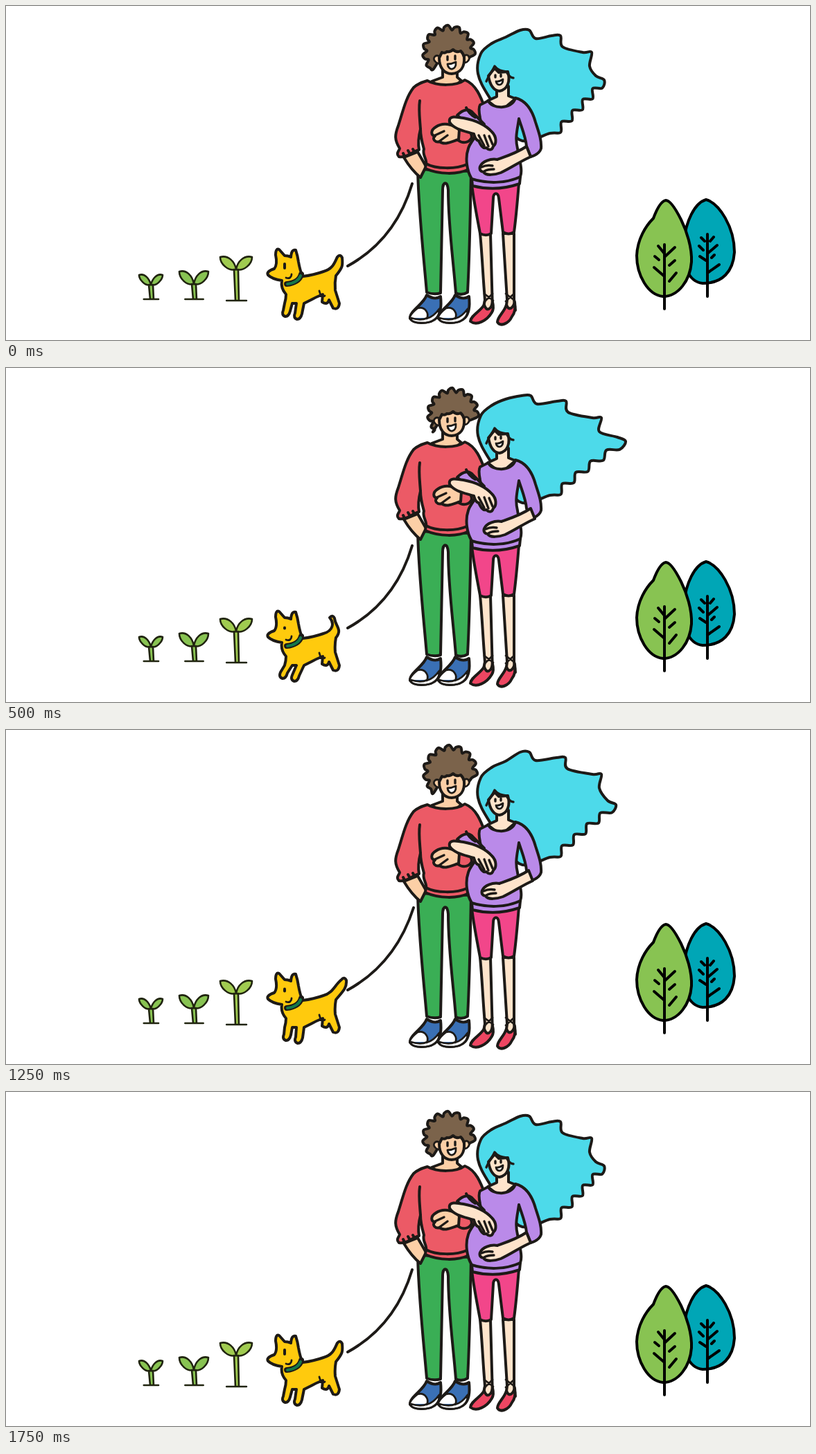
These frames come from a looping animation (1160x483 px, 2000 ms). An HTML page:

```html
<!DOCTYPE html>
<html lang="en">
<head>
<meta charset="utf-8">
<title>Family walk</title>
<style>
html, body { margin: 0; width: 100%; height: 100%; overflow: hidden; background: #fff; }
svg { display: block; width: 100%; height: 100%; }
.ink { stroke: #1d1a17; stroke-width: 4; stroke-linecap: round; stroke-linejoin: round; fill: none; }
.thin { stroke-width: 2.8; }
.finger { stroke-width: 3.4; }
.leaf { stroke: #000; }
.sprout { stroke: #20240f; stroke-width: 2.6; }
.red { fill: #ec5a66; }
.green { fill: #3aae55; }
.peach { fill: #fccfa6; }
.cream { fill: #fee4cb; }
.purple { fill: #ba8ae9; }
.pink { fill: #f2468a; }
.blue { fill: #3a70b5; }
.cyan { fill: #4ddaea; }
.brown { fill: #7b634b; }
.yellow { fill: #ffca0d; }
.white { fill: #fff; }
</style>
</head>
<body>
<svg viewBox="0 0 1160 483">
  <defs>
    <g id="shoe">
      <path class="blue" d="M607 418C602 432 582 441 583 452C589 461 614 459 621 451C629 443 628 429 627 420C620 425 613 422 607 418Z"/>
      <path class="white thin" d="M594 437C605 434 611 445 607 452C615 450 620 445 625 438C626 447 620 456 606 458C592 459 583 457 583 449C586 443 590 440 594 437ZM584 451C593 454 602 454 608 451"/>
    </g>
  </defs>

  <g id="sprouts" class="ink sprout"></g>

  <!-- trees -->
  <g class="ink leaf">
    <path fill="#00a6b6" d="M1010 280C1029 285 1051 320 1051 356C1049 384 1034 401 1005 401C985 399 974 374 978 340C981 312 993 285 1010 280Z"/>
    <path d="M1012 330V420M1003 335L1008 340M1021 334L1016 340M1000 347L1006 353M1026 346L1012 358M1001 362L1010 368M1022 360L1018 364M1029 374L1012 386"/>
    <path fill="#88c352" d="M952 281C958 281 966 293 974 309C982 325 990 350 989 370C987 397 970 420 948 420C926 418 910 389 910 361C911 337 923 318 934 307C937 299 944 282 952 281Z"/>
    <path d="M950 345V438M941 347L950 358M965 349L950 363M936 362L942 367M965 368L957 375M935 378L950 391M967 386L957 398"/>
  </g>

  <!-- dog -->
  <path id="leash" class="ink"/>
  <path id="dog" class="ink yellow"/>
  <path id="dogEye" class="ink"/>
  <path class="ink thin" d="M404 393C409 395 412 392 412 388M452 412C453 418 457 421 460 419"/>
  <path class="ink" style="stroke-width:8" d="M405 402C416 401 424 396 426 388"/>
  <path class="ink" style="stroke:#15784a" d="M406 402C416 401 423 396 425 390"/>

  <path id="womanHair" class="ink cyan"/>

  <!-- man -->
  <g class="ink">
    <path class="peach" d="M630 92V103L614 109L637 124L657 108L651 103V92Z"/>
    <path id="manHair" class="brown"/>
    <path class="peach thin" d="M626 73C619 69 615 76 619 80C622 84 626 83 627 82M661 72C667 68 670 75 667 79C664 83 661 82 660 80"/>
    <path class="peach" d="M625 75L629 67Q633 69 636 66Q641 67 645 63Q650 68 656 65Q660 69 661 74C662 88 656 97 643 98C632 98 625 89 625 75Z"/>
    <path class="finger" d="M637 73V78M648 72V77"/>
    <path class="white thin" d="M637 84C641 84 645 83 649 81C650 94 638 94 637 84Z"/>
    <path class="green" d="M594 236C595 293 602 356 607 414C615 417 621 417 627 415L630 266C630 254 637 252 638 266C638 316 645 365 649 415C655 418 661 417 666 414C669 357 670 299 671 239Z"/>
    <path class="peach" d="M574 219C580 229 587 239 598 248L606 232L594 211Z"/>
    <path class="red" d="M608 108C622 116 650 116 662 107C678 113 685 131 692 150L686 182L666 230C650 243 620 243 606 229C608 222 600 215 603 207C600 196 598 189 598 178C595 190 594 198 596 208C585 211 578 220 567 218C562 213 567 210 568 206C560 193 561 186 566 173C573 151 577 132 588 118C594 112 601 110 608 108Z"/>
    <path d="M597 137C595 150 597 163 598 178M573 213L575 217M580 209L583 214M587 207L590 212"/>
    <path class="red" d="M606 228L605 235C625 244 652 244 668 236L665 229C650 236 620 236 606 228Z"/>
    <use href="#shoe"/>
    <use href="#shoe" x="41"/>
  </g>

  <!-- woman -->
  <g class="ink">
    <path class="cream" d="M684 329C687 360 688 390 691 425L688 440H702L699 329ZM717 329L723 425L721 440H735L733 425L733 329Z"/>
    <path class="thin" d="M690 416L703 426M702 416L690 428M721 416L734 426M733 416L721 427"/>
    <path fill="#ee4662" d="M690 432C684 442 671 447 670 456C679 463 694 455 701 443C704 438 703 432 702 428C700 439 693 443 690 432ZM722 432C719 443 709 449 709 457C713 464 725 460 730 449C735 443 735 435 734 428C731 438 725 441 722 432Z"/>
    <path class="pink" d="M672 258C675 283 680 307 684 329C690 332 695 332 700 329L703 278C703 269 710 269 711 278L717 327C722 330 728 330 733 327C736 305 738 281 740 256Z"/>
    <path class="cream" d="M708 118V131L695 137L714 152L735 134L725 130V116Z"/>
    <path class="purple" d="M672 250L673 260C696 266 718 265 741 257L742 247Z"/>
    <path class="purple" d="M696 137C700 149 730 151 735 133C751 137 759 150 764 168C768 181 773 193 772 206C770 213 764 216 757 218L751 203C750 190 744 176 740 163C738 178 734 190 738 206C740 220 746 237 742 247C721 257 693 257 672 250C665 239 662 220 667 206C670 194 689 181 684 162C682 152 682 146 684 143Z"/>
    <path class="cream" d="M696 101L705 90L711 96L724 95C728 108 724 121 712 123C702 122 698 113 696 101Z"/>
    <path class="finger" d="M693 109C697 99 702 94 705 87C709 93 716 94 722 95C725 101 728 104 732 104M706 100V103M714 99V102"/>
    <path class="white thin" d="M707 109C711 110 714 108 717 106C717 116 708 116 707 109Z"/>
    <g id="bellyHand">
      <path class="cream" d="M751 203C738 212 723 217 709 222C699 220 687 225 684 232C682 237 686 240 689 240C692 246 706 244 714 241C729 234 743 224 757 218Z"/>
      <path class="finger" d="M686 233C692 230 696 230 702 231M690 239C695 236 699 236 704 236"/>
    </g>
  </g>

  <!-- linked arms -->
  <g class="ink">
    <path class="purple" d="M651 158C659 150 668 147 674 155L690 171L660 166Z"/>
    <path d="M664 147Q668 156 677 161"/>
    <path class="red" d="M652 178C660 174 672 180 672 190C669 197 660 200 652 194Z"/>
    <g id="manHand">
      <path class="peach" d="M654 179C644 170 630 168 620 175C612 180 613 187 619 188C614 192 619 198 626 196C632 202 643 196 653 193Z"/>
      <path class="finger" d="M619 187L632 181M626 195L637 187"/>
    </g>
    <path class="cream" d="M640 168C638 158 650 160 660 162C676 165 692 172 701 182C708 189 708 199 703 203C701 210 696 208 693 205C687 207 684 199 682 195C677 194 676 188 675 185C663 181 647 179 640 168Z"/>
    <path class="finger" d="M682 187L690 202M690 187L696 203M697 188L702 200"/>
  </g>
</svg>
<script>
const STEP = 250, LOOP = 2000;
const byId = id => document.getElementById(id);
const range = (n, make) => Array.from({ length: n }, (_, i) => make(i));

// Smooth closed curve through points.
function blob(points) {
  const at = i => points[(i + points.length) % points.length];
  return points.reduce((d, b, i) => {
    const a = at(i - 1), c = at(i + 1), e = at(i + 2);
    const c1 = b.map((v, k) => v + (c[k] - a[k]) / 6);
    const c2 = c.map((v, k) => v - (e[k] - b[k]) / 6);
    return d + 'C' + [c1, c2, c];
  }, 'M' + points[0]) + 'Z';
}

// Three big locks run along the top to the tip, small ripples lead back.
function womanHair({ crown: [x, y], gap, tip }) {
  const back = [[740, 193], [698, 133], [681, 98], [685, 69], [701, 54], [721, 45]];
  const top = range(3, k => {
    const px = x + gap * k, py = y + 8 * k * k;
    return [[px - 6, py + 2], [px + 7, py + 2], [px + 16 - 6 * k, py + 14 + 4 * k]];
  }).flat();
  const bend = [830, 145], end = [788, 187];
  const ripples = range(10, i => {
    const t = (i + 1) / 10, out = i % 2 ? -3 : 4;
    return tip.map((v, k) => (1 - t) ** 2 * v + 2 * t * (1 - t) * bend[k] + t * t * end[k] + out);
  });
  return blob([...back, ...top, [tip[0] - 12, tip[1] - 6], tip, ...ripples]);
}

// Tufts fan around the head from the left ear to the right temple.
function manHair({ head: [x, y], tuft }) {
  const polar = (deg, r) => {
    const a = deg * Math.PI / 180;
    return [x + r * Math.cos(a), y + r * Math.sin(a)];
  };
  const tufts = range(10, k => {
    const deg = 145 + 24 * k;
    return [polar(deg - 6, tuft - 2), polar(deg + 4, tuft), polar(deg + 13, tuft * 0.83)];
  }).flat();
  return blob([[616, 92], ...tufts, [664, 76], [640, 70], [626, 78]]);
}

const leg = (hip, x, y) =>
  `L${hip + 6} 430L${x + 6} ${y - 8}Q${x + 4} ${y} ${x - 1} ${y}Q${x - 7} ${y - 2} ${x - 4} ${y - 9}L${hip - 5} 430`;

function dog({ tail: [x, y], stride }) {
  return 'M378 389Q375 384 387 380Q392 374 389 360Q389 350 394 352L402 361Q407 361 411 363Q412 351 418 353Q421 362 422 370Q424 382 428 391Q444 389 458 384' +
    `C472 380 474 ${y + 10} ${x - 4} ${y + 2}Q${x} ${y - 3} ${x + 3} ${y + 3}C${x + 4} ${y + 14} 486 378 476 390` +
    'Q474 400 475 411L481 430Q480 440 472 437L466 425Q464 433 456 428L457 417Q447 421 440 425' +
    leg(424, 421 + stride, 453) + leg(407, 404 + stride, 449) +
    'Q404 423 404 417Q396 408 398 397Q384 395 378 389Z';
}

// Lines per plant: stem x, joint y, ground y, leaf width, leaf height.
function sprout(x, joint, ground, w, h, fill) {
  const leaf = s =>
    `M${x} ${joint}C${x + s * w * 0.5} ${joint + 3} ${x + s * w} ${joint - 8} ${x + s * w} ${joint - h}` +
    `C${x + s * w * 0.5} ${joint - h - 3} ${x + s * 2} ${joint - h + 6} ${x} ${joint}`;
  const stem = `M${x - 3} ${joint}L${x - 1} ${ground}H${x + 4}L${x + 3} ${joint}`;
  const soil = `M${x - w * 0.6} ${ground}H${x + w * 0.65}`;
  return `<path fill="${fill}" d="${stem + leaf(-1) + leaf(1) + soil}"/>`;
}
byId('sprouts').innerHTML =
  sprout(209, 403, 424, 17, 14, '#88c352') +
  sprout(271, 402, 424, 21, 18, '#88c352') +
  sprout(332, 381, 426, 23, 18, '#a0cb50');

const calm = { crown: [748, 33], gap: 45, tip: [863, 107], head: [639, 66], tuft: 38, tail: [482, 361], stride: 0, eye: 6, leash: 586, man: 0, belly: 0 };
const gust = { crown: [750, 38], gap: 51, tip: [894, 106], head: [645, 66], tuft: 37, tail: [471, 359], stride: -4, eye: 1, leash: 586, man: 3, belly: 6 };
const ease = { crown: [743, 34], gap: 50, tip: [891, 106], head: [641, 65], tuft: 38, tail: [484, 360], stride: 0, eye: 1, leash: 587, man: 2, belly: 6 };
const puff = { crown: [738, 35], gap: 49, tip: [876, 107], head: [641, 64], tuft: 39, tail: [488, 359], stride: 4, eye: 4, leash: 588, man: 2, belly: 6 };
const lift = { crown: [748, 30], gap: 52, tip: [876, 108], head: [641, 61], tuft: 39, tail: [485, 360], stride: 1, eye: 3, leash: 588, man: 0, belly: 3 };
const poses = [calm, puff, gust, ease, puff, { ...lift, tip: [880, 108], tail: puff.tail }, lift, calm];

function show(pose) {
  const draw = (id, d) => byId(id).setAttribute('d', d);
  const shift = (id, x) => byId(id).setAttribute('transform', `translate(${x} 0)`);
  draw('womanHair', womanHair(pose));
  draw('manHair', manHair(pose));
  draw('dog', dog(pose));
  draw('leash', `M${pose.leash} 257Q562 338 493 376`);
  draw('dogEye', `M402 ${376 - pose.eye / 2}v${pose.eye}`);
  shift('manHand', pose.man);
  shift('bellyHand', pose.belly);
}

const start = performance.now();
let current = -1;
function tick() {
  const index = Math.floor((performance.now() - start) % LOOP / STEP);
  if (index !== current) show(poses[current = index]);
  requestAnimationFrame(tick);
}
tick();
</script>
</body>
</html>
```
